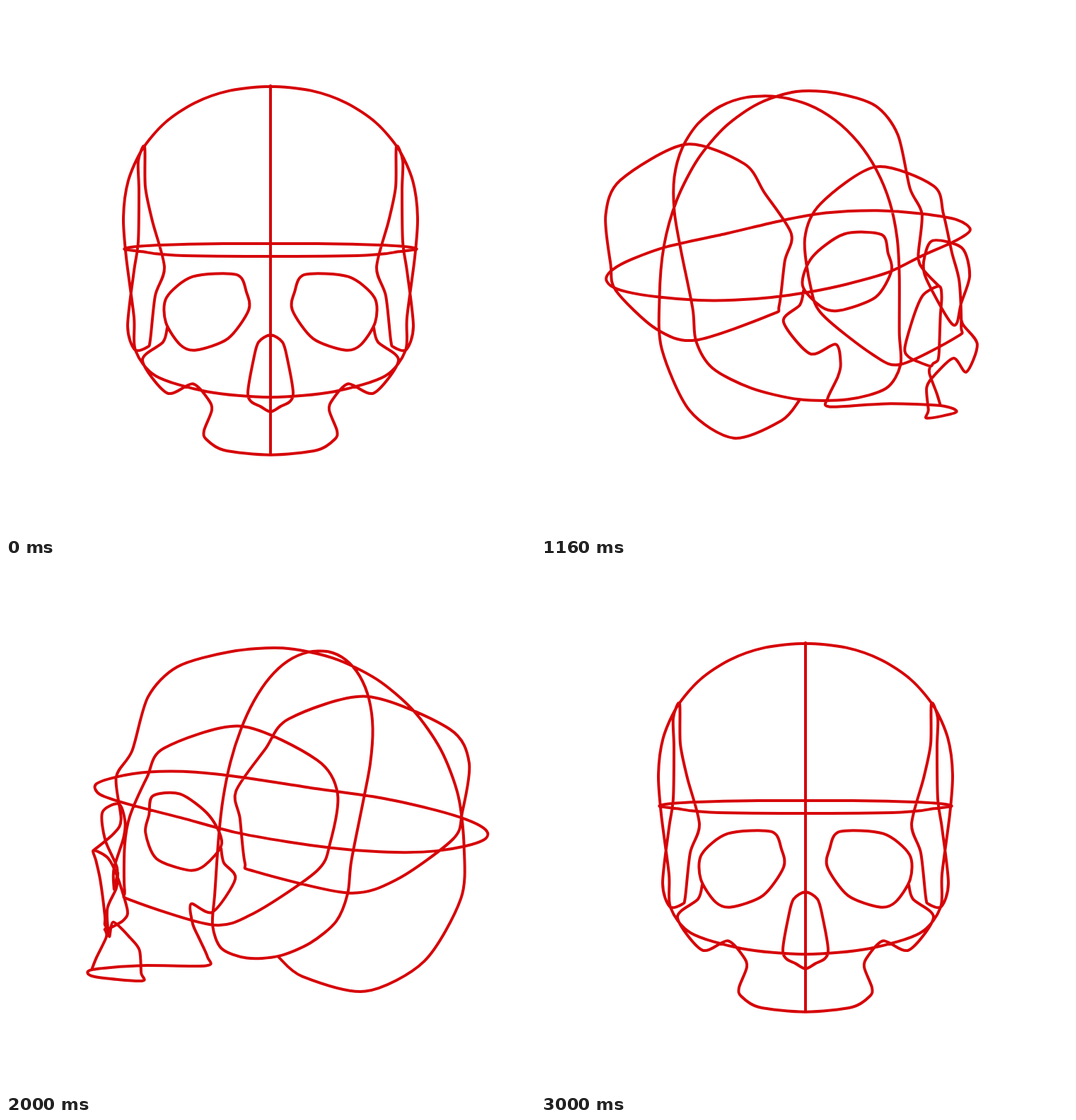
Recreate the animation shown at these times as an HTML page with a canvas. Size 748 by 748 pixels, loop 3.04 s.

```html
<!DOCTYPE html>
<html lang="en">
<head>
<meta charset="utf-8">
<title>Turning wireframe skull</title>
<style>
html, body { margin: 0; width: 100%; height: 100%; overflow: hidden; background: #fff; }
canvas { display: block; }
</style>
</head>
<body>
<canvas id="stage" width="748" height="748"></canvas>
<script>
const ctx = document.getElementById('stage').getContext('2d');
const STEP = 40, STEPS = 75, CENTER = 374;
const TILT = 0.136;   // sine of the camera elevation
const TENSION = 1 / 7;

// Quarter of a superellipse, from (0, height) to (width, 0).
const quarter = (width, height, power) => Array.from({ length: 7 }, (_, i) => {
  const a = i / 6 * Math.PI / 2;
  return [width * Math.sin(a) ** (2 / power), height * Math.cos(a) ** (2 / power)];
});

const flip = points => points.map(([x, y, z]) => [-x, y, z]);
const joined = half => [...half, ...flip(half.slice(0, -1)).reverse()];
const loop = half => joined(half).slice(0, -1);
const midline = points => points.map(([z, y]) => [0, y, z]);

// Points are x (sideways), y (down), z (forward); one half of the head.
const profile = midline([
  [-14, 557], [-52, 581], [-155, 595], [-251, 546], [-311, 453],
  ...quarter(261, 296, 2.1).map(([y, z]) => [-20 - z, 380 - y]),
  [66, 130], [152, 157], [200, 203], [226, 281], [252, 320], [244, 379], [256, 400], [289, 426]
]);
const teeth = midline([[270, 537], [268, 547], [284, 577], [292, 595]]);

const arch = [
  ...quarter(208, 183, 2.1).map(([x, y]) => [x, 305 - y]),
  [204, 360], [193, 443], [191, 489], [162, 525], [90, 547], [0, 555]
].map(([x, y]) => [x, y, -37 - 24 * Math.cos(Math.PI * (y - 122) / 433)]);

const band = [
  ...quarter(206, 257, 2.4).map(([x, z]) => [x, -60 - z]),
  [181, 42], [162, 136], [135, 200], [75, 242], [0, 252]
].map(([x, z]) => [x, 346 - 0.104 * z, z]);

const temple = [
  [178, 206, -54], [187, 244, -184], [186, 290, -217], [187, 361, -205], [193, 400, -187],
  [202, 465, -90], [192, 488, -16], [174, 465, 127], [170, 453, 140], [163, 390, 144],
  [150, 350, 143], [167, 290, 105], [177, 246, 72]
];

const orbit = [
  [48, 350, 220], [110, 354, 211], [147, 387, 185], [148, 425, 165], [127, 455, 181],
  [105, 460, 195], [60, 440, 221], [31, 400, 222], [34, 375, 218]
];

const jaw = [
  [146, 432, 165], [152, 453, 164], [181, 479, 162], [146, 523, 179], [110, 508, 193],
  [88, 532, 178], [83, 549, 166], [94, 579, 157], [91, 591, 158], [66, 594, 250], [0, 595, 292]
];

const nose = [
  [0, 426, 289], [17, 438, 275], [24, 464, 264], [32, 512, 252],
  [27, 525, 255], [14, 531, 260], [0, 537, 270]
];

const open = [profile, teeth, joined(jaw)];
const closed = [loop(arch), loop(band), loop(nose), temple, flip(temple), orbit, flip(orbit)];

// Smooth curve through the turned and projected points.
function trace(points, isClosed, cos, sin) {
  const flat = points.map(([x, y, z]) => [
    CENTER + x * cos + z * sin,
    y + TILT * (z * cos - x * sin)
  ]);
  const n = flat.length;
  const at = i => flat[isClosed ? (i + n) % n : Math.max(0, Math.min(n - 1, i))];
  const handle = (i, sign) => [0, 1].map(k => at(i)[k] + sign * TENSION * (at(i + 1)[k] - at(i - 1)[k]));
  ctx.moveTo(...flat[0]);
  for (let i = 0; i < (isClosed ? n : n - 1); i++) {
    ctx.bezierCurveTo(...handle(i, 1), ...handle(i + 1, -1), ...at(i + 1));
  }
  if (isClosed) ctx.closePath();
}

function draw(time) {
  const step = Math.floor(time / STEP) % (STEPS + 1);
  const angle = 2 * Math.PI * step / STEPS;
  const cos = Math.cos(angle), sin = Math.sin(angle);
  ctx.fillStyle = '#fff';
  ctx.fillRect(0, 0, 748, 748);
  ctx.strokeStyle = '#d60408';
  ctx.lineWidth = 4;
  ctx.lineCap = ctx.lineJoin = 'round';
  ctx.beginPath();
  for (const points of open) trace(points, false, cos, sin);
  for (const points of closed) trace(points, true, cos, sin);
  ctx.stroke();
}

const start = performance.now();
function tick() {
  draw(performance.now() - start);
  requestAnimationFrame(tick);
}
tick();
</script>
</body>
</html>
```
